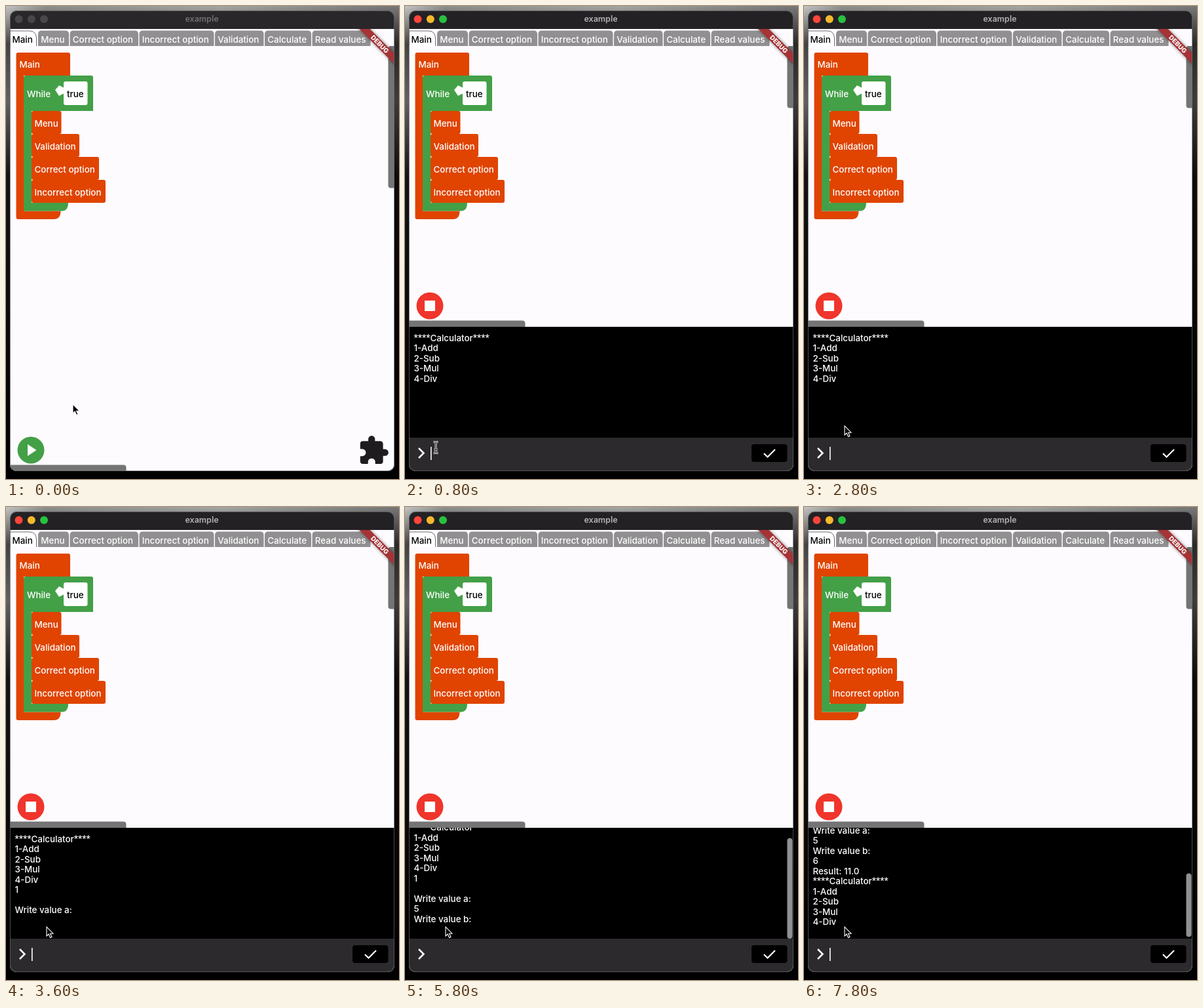
These frames come from a looping animation (600x721 px, 8000 ms). An HTML page:

```html
<!DOCTYPE html>
<html lang="en">
<head>
<meta charset="utf-8">
<title>Block program</title>
<style>
  html, body { margin: 0; width: 100%; height: 100%; overflow: hidden; background: #000; }
  svg { display: block; width: 600px; height: 721px; font: 500 13.4px Inter, Roboto, sans-serif; }
  .white { fill: #fff; }
  .orange { fill: #e04400; }
  .green { fill: #43a047; }
  .thumb { fill: #757475; }
  .stars { font: 14.5px Roboto, sans-serif; }
</style>
</head>
<body>
<svg viewBox="0 0 600 721">
  <defs>
    <linearGradient id="sky">
      <stop offset="0" stop-color="#c4c4c4"/><stop offset=".1" stop-color="#8f8f8d"/>
      <stop offset=".55" stop-color="#a6a6a4"/><stop offset="1" stop-color="#777"/>
    </linearGradient>
    <linearGradient id="side" x2="0" y2="1">
      <stop offset="0" stop-color="#000" stop-opacity="0"/><stop offset=".08" stop-color="#000" stop-opacity=".65"/>
      <stop offset=".2" stop-color="#000" stop-opacity=".5"/><stop offset=".36" stop-color="#000" stop-opacity=".9"/>
      <stop offset="1" stop-color="#000"/>
    </linearGradient>
    <clipPath id="window"><rect x="6" y="7" width="587" height="702" rx="10"/></clipPath>
    <clipPath id="page"><rect x="6" y="35" width="587" height="674"/></clipPath>
    <clipPath id="output"><rect x="6" y="489" width="587" height="169"/></clipPath>
    <filter id="blur" x="-20%" y="-100%" width="140%" height="300%"><feGaussianBlur stdDeviation="3"/></filter>
  </defs>

  <rect width="600" height="721" fill="url(#sky)"/>
  <rect width="600" height="721" fill="url(#side)"/>

  <g clip-path="url(#window)">
    <rect x="6" y="7" width="587" height="702" fill="#fefbff"/>
    <rect id="titleBar" x="6" y="7" width="587" height="28"/>
    <g id="lights"><circle cx="19.5" cy="20" r="6"/><circle cx="38.8" cy="20" r="6"/><circle cx="58" cy="20" r="6"/></g>
    <text id="title" x="299" y="24" text-anchor="middle" font-size="12.5" font-weight="600">example</text>

    <g id="tabs"></g>
    <path d="M6 61V38H36Q46 38 46.5 49V61" fill="#fff" stroke="#6a686b"/>
    <text x="9.5" y="55.5">Main</text>

    <path class="orange" d="M18.500 71H95Q98 71 98 74V106H27V312.500H83.500Q83.500 325 73 325H18.500Q15.500 325 15.500 322V74Q15.500 71 18.500 71Z"/>
    <path class="green" d="M30 106H130Q133 106 133 109V160H39V300H95Q95 312.500 85 312.500H27V109Q27 106 30 106Z"/>
    <path class="white" d="M75 128L81 121L89 125V133L81 137Z"/>
    <rect class="white" x="88" y="115" width="36.5" height="36" rx="3"/>
    <text class="white" x="20.5" y="94">Main</text>
    <text class="white" x="32" y="139">While</text>
    <text x="93" y="139">true</text>
    <g id="calls"></g>

    <rect id="pageThumb" class="thumb" x="583.5" y="61" width="14" rx="4"/>
    <path id="sideThumb" class="thumb" d="M6 0H179Q183.500 0 183.500 4V10H6Z"/>

    <g id="idle">
      <circle class="green" cx="38" cy="677" r="20.5"/>
      <path class="white" d="M33 668V686L46.500 677Z"/>
      <path transform="translate(536.7 653) scale(2.05)" fill="#1f1c20" d="M20.5 11H19V7c0-1.1-.9-2-2-2h-4V3.500a2.500 2.500 0 0 0-5 0V5H4a2 2 0 0 0-2 2v3.800h1.500a2.700 2.700 0 0 1 0 5.400H2V20a2 2 0 0 0 2 2h3.800v-1.500a2.700 2.700 0 0 1 5.400 0V22H17a2 2 0 0 0 2-2v-4h1.500a2.500 2.500 0 0 0 0-5z"/>
    </g>

    <g id="running">
      <circle cx="38" cy="457" r="20.5" fill="#f0352c"/>
      <rect class="white" x="30" y="449" width="16" height="16"/>
      <rect x="6" y="489" width="587" height="169"/>
      <g clip-path="url(#output)">
        <g id="log" class="white"></g>
        <rect id="logThumb" x="583.5" width="8" rx="4" fill="#918f92"/>
      </g>
      <rect x="6" y="658" width="587" height="51" fill="#2c2a2d"/>
      <path d="M21 674L28.500 681.500L21 689" fill="none" stroke="#fff" stroke-width="2.500"/>
      <text id="entry" class="white" x="39" y="686"></text>
      <rect id="caret" class="white" y="672" width="1.600" height="20"/>
      <rect x="529" y="668" width="54.5" height="27" rx="4"/>
      <path d="M548 682L553.500 687.500L565 676" fill="none" stroke="#fff" stroke-width="2.200"/>
    </g>

    <g clip-path="url(#page)">
      <g transform="translate(593.5 35.300) rotate(45) scale(.95)">
        <rect x="-60" y="28" width="120" height="12" opacity=".5" filter="url(#blur)"/>
        <rect x="-60" y="28" width="120" height="12" fill="#a63335"/>
        <text class="white" y="37.700" text-anchor="middle" font-size="10.300" font-weight="800">DEBUG</text>
      </g>
    </g>
  </g>
  <rect x="6.500" y="7.500" width="586" height="701" rx="10" fill="none" stroke="#6b696c" stroke-opacity=".7"/>

  <path id="arrow" d="M0 0V14L3.200 11L5.600 16.500L8 15.500L5.600 10.200H10Z" stroke="#fff" stroke-width="1.100"/>
  <g id="beam" fill="none">
    <path id="beamShape" d="M-3.500 -8.500Q0 -8.500 0 -6Q0 -8.500 3.500 -8.500M0 -6V6M-3.500 8.500Q0 8.500 0 6Q0 8.500 3.500 8.500M-2.500 3H2.500"/>
    <use href="#beamShape" stroke="#fff" stroke-width="2.800"/>
    <use href="#beamShape" stroke="#000"/>
  </g>
</svg>
<script>
const LOOP = 8000, ACTIVATE = 500, START = 700;
const LINE = 15.5, VIEW = 169, TOP = 489;
const $ = id => document.getElementById(id);
const set = (id, attrs) => { for (const k in attrs) $(id).setAttribute(k, attrs[k]); };
const show = (id, on) => set(id, { visibility: on ? 'visible' : 'hidden' });
const clamp = v => Math.max(0, Math.min(1, v));
const smooth = v => { v = clamp(v); return v * v * (3 - 2 * v); };
const mix = (a, b, p) => a + (b - a) * p;

const MENU = ['****Calculator****', '1-Add', '2-Sub', '3-Mul', '4-Div'];
const answers = [
  { key: '1', typed: 2850, sent: 3250, reply: ['', 'Write value a:'] },
  { key: '5', typed: 4700, sent: 5100, reply: ['Write value b:'] },
  { key: '6', typed: 7100, sent: 7500, reply: ['Result: 11.0', ...MENU] }
];

const tabs = [['Menu', 49, 96], ['Correct option', 97.5, 202], ['Incorrect option', 203.5, 317.5],
  ['Validation', 319, 393.5], ['Calculate', 395, 466], ['Read values', 467.5, 556.5]];
$('tabs').innerHTML = tabs.map(([name, a, b]) =>
  `<path fill="#918f91" d="M${a} 61V43Q${a} 37.500 ${a + 5} 37.500H${b - 5}Q${b} 37.500 ${b} 43V61Z"/>
   <text class="white" x="${a + 4.3}" y="55.500">${name}</text>`).join('');

const calls = [['Menu', 45.5], ['Validation', 73], ['Correct option', 103], ['Incorrect option', 113]];
$('calls').innerHTML = calls.map(([name, w], i) =>
  `<rect class="orange" x="39" y="${160 + 35 * i}" width="${w}" height="35" rx="3"/>
   <text class="white" x="43.500" y="${183.5 + 35 * i}">${name}</text>`).join('');

const contentHeight = lines => (lines.length + 1) * LINE + 16;
const maxScroll = lines => Math.max(0, contentHeight(lines) - VIEW);
const markStars = s => s.replace(/\*+/g, '<tspan class="stars">$&</tspan>');

function drawConsole(t) {
  let lines = MENU, previous = MENU, changed = START, blinkFrom = START, entry = '';
  for (const { key, typed, sent, reply } of answers) {
    if (t >= sent) {
      previous = lines;
      lines = [...lines, key, ...reply];
      changed = blinkFrom = sent;
    } else if (t >= typed) {
      entry = key;
      blinkFrom = typed;
    }
  }
  const left = 1 - clamp((t - changed) / 380);
  const scroll = mix(maxScroll(previous), maxScroll(lines), 1 - left * left);
  const height = contentHeight(lines);

  const text = lines.map((s, i) => `<text x="13.500" y="${510.5 + i * LINE}">${markStars(s)}</text>`).join('');
  if ($('log').dataset.text !== text) $('log').innerHTML = $('log').dataset.text = text;
  set('log', { transform: `translate(0 ${-scroll})` });
  set('logThumb', {
    y: TOP + scroll / height * VIEW,
    height: VIEW * VIEW / height,
    opacity: maxScroll(lines) > 0 ? 1 : 0
  });
  $('entry').textContent = entry;
  set('caret', {
    x: 39 + (entry ? $('entry').getComputedTextLength() + 1 : 0),
    opacity: (t - blinkFrom) % 1000 < 500 ? 1 : 0
  });
}

function drawPointer(t) {
  const toButton = smooth((t - 50) / 450), toOutput = smooth((t - 900) / 600);
  const x = mix(mix(102, 47, toButton), 62, toOutput);
  const y = mix(mix(607, 673, toButton), 640, toOutput);
  const overEntry = t >= START && y > 658;
  show('arrow', !overEntry);
  show('beam', overEntry);
  set(overEntry ? 'beam' : 'arrow', { transform: `translate(${x} ${y})` });
}

function draw(t) {
  const active = t >= ACTIVATE, running = t >= START;
  set('titleBar', { fill: active ? '#232124' : '#29272a' });
  set('title', { fill: active ? '#b3b1b4' : '#717072' });
  const colors = active ? ['#ff453b', '#f6b92d', '#27c13f'] : Array(3).fill('#49474a');
  [...$('lights').children].forEach((light, i) => light.setAttribute('fill', colors[i]));
  show('idle', !running);
  show('running', running);
  set('pageThumb', { height: running ? 94.5 : 216.5 });
  set('sideThumb', { transform: `translate(0 ${running ? 479.5 : 699.5})` });
  drawConsole(t);
  drawPointer(t);
}

function frame() {
  draw(performance.now() % LOOP);
  requestAnimationFrame(frame);
}
frame();
</script>
</body>
</html>
```
